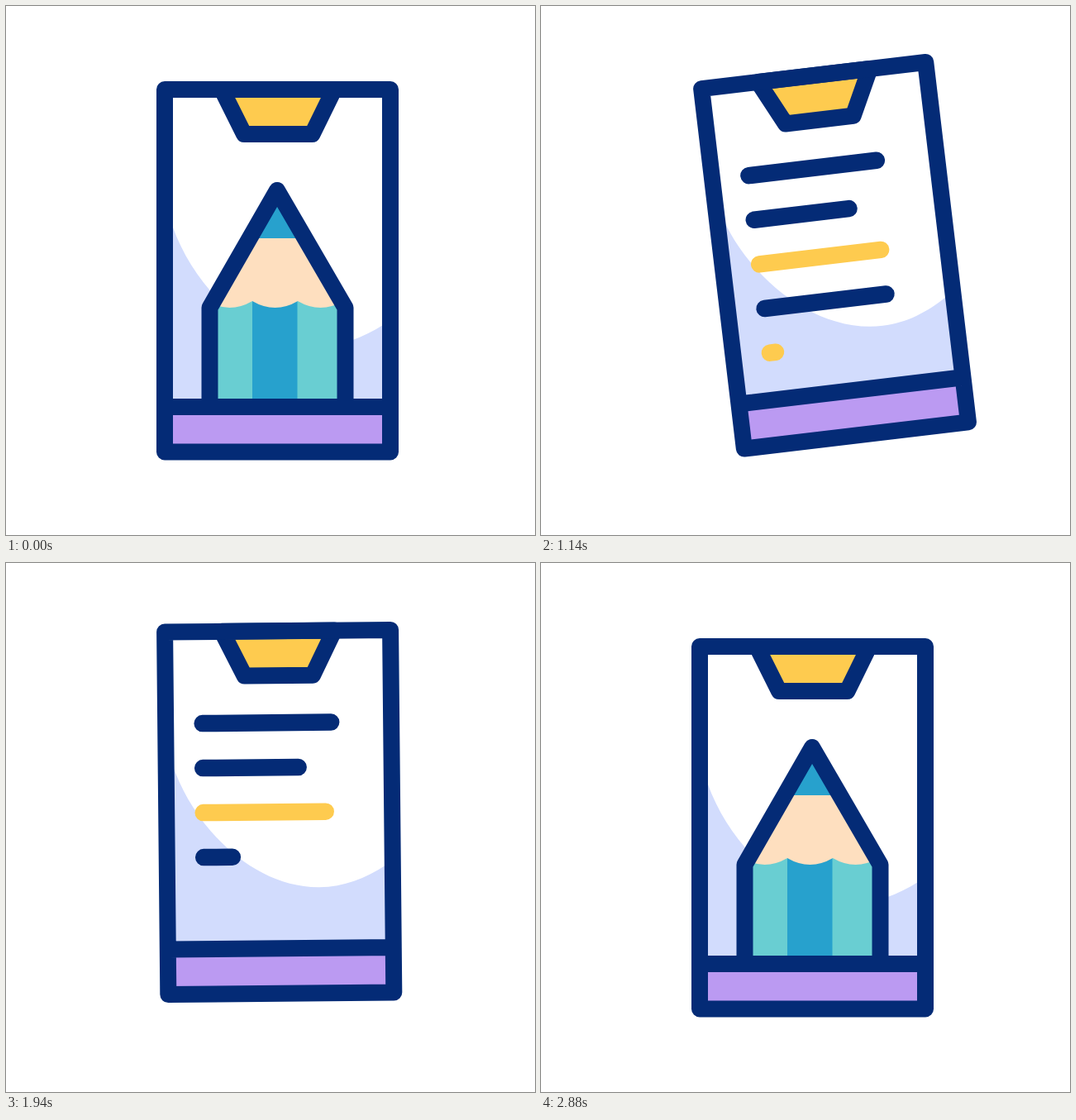
An HTML page for the animation above (3.2 s loop, 640x640 px).

```html
<!DOCTYPE html>
<html>
<head>
<meta charset="utf-8">
<style>
  html, body { margin: 0; height: 100%; overflow: hidden; background: #fff; }
  svg { display: block; width: 100%; height: 100%; }
  .ink { stroke: #042b76; stroke-width: 20; stroke-linejoin: round; stroke-linecap: round; }
</style>
</head>
<body>
<svg viewBox="0 0 640 640" fill="none">
  <defs>
    <clipPath id="screen"><path d="M192 101H465V485H192Z"/></clipPath>
    <clipPath id="pencilShape"><path d="M246.5 530V365L328 223L410.5 365V530Z"/></clipPath>
  </defs>
  <g id="board">
    <path fill="#fff" d="M192 101H465V540H192Z"/>
    <g clip-path="url(#screen)">
      <path fill="#d2dcfd" d="M192 236L202 268C228 340 297 411.5 376 411.5C406 411.5 432 401 456 386L470 376V490H192Z"/>
      <g id="lines" stroke-width="20.5" stroke-linecap="round"></g>
      <g id="pencil">
        <g clip-path="url(#pencilShape)">
          <path fill="#69ced2" d="M240 340H416V530H240Z"/>
          <path fill="#27a1cd" d="M298 340H352.5V530H298Z"/>
          <path fill="#fedfbf" d="M243 281V357q27.5 16 55 0q27.5 16 55 0q27.5 16 55 0V281Z"/>
          <path fill="#27a1cd" d="M243 210H410V281H243Z"/>
        </g>
        <path class="ink" d="M246.5 530V365L328 223L410.5 365V530"/>
      </g>
    </g>
    <path fill="#bb9af2" d="M192 485H465V540H192Z"/>
    <path class="ink" fill="#fecb4f" d="M261 101L288 155H370.5L397 101Z"/>
    <path class="ink" d="M192 101H465V539.5H192ZM192 485H465"/>
  </g>
</svg>
<script>
const LOOP = 3200;
const NAVY = '#042b76', YELLOW = '#fecb4f';
const byId = id => document.getElementById(id);
const clamp = x => Math.min(1, Math.max(0, x));

// Keys are [time, value]; each step eases in and out along a half cosine.
const angleKeys = [[200, 0], [682, 8], [1180, -7], [1685, 8], [2155, -7], [2655, 0]];
const liftKeys = [[190, 0], [565, -48.5], [1066, -15], [1555, -48], [2050, -15], [2540, 0]];
const pencilKeys = [[200, 0], [491, 270], [2090, 270], [2880, 0]];

function track(keys, t) {
  let value = keys[0][1];
  for (let i = 1; i < keys.length; i++) {
    const [t0, v0] = keys[i - 1], [t1, v1] = keys[i];
    if (t < t0) break;
    const u = clamp((t - t0) / (t1 - t0));
    value = v0 + (v1 - v0) * (1 - Math.cos(Math.PI * u)) / 2;
  }
  return value;
}

const lines = [[155.5, NAVY], [115.5, NAVY], [148, YELLOW], [148, NAVY], [93, YELLOW]].map(([length, color], i) => {
  const el = document.createElementNS('http://www.w3.org/2000/svg', 'path');
  el.setAttribute('stroke', color);
  byId('lines').append(el);
  return { el, length, y: 212 + 54 * i };
});

function draw(now) {
  const t = now % LOOP;
  byId('board').setAttribute('transform',
    `translate(0 ${track(liftKeys, t)}) rotate(${track(angleKeys, t)} 328.5 91)`);
  byId('pencil').setAttribute('transform', `translate(0 ${track(pencilKeys, t)})`);

  // Lines are written top to bottom, then erased bottom to top.
  const written = (t - 346) / 195, left = (2701 - t) / 235;
  lines.forEach(({ el, length, y }, i) => {
    const part = clamp(Math.min(written, left) - i);
    el.setAttribute('d', part > 0 ? `M236.5 ${y}h${length * part}` : '');
  });
  requestAnimationFrame(draw);
}
requestAnimationFrame(draw);
</script>
</body>
</html>
```
